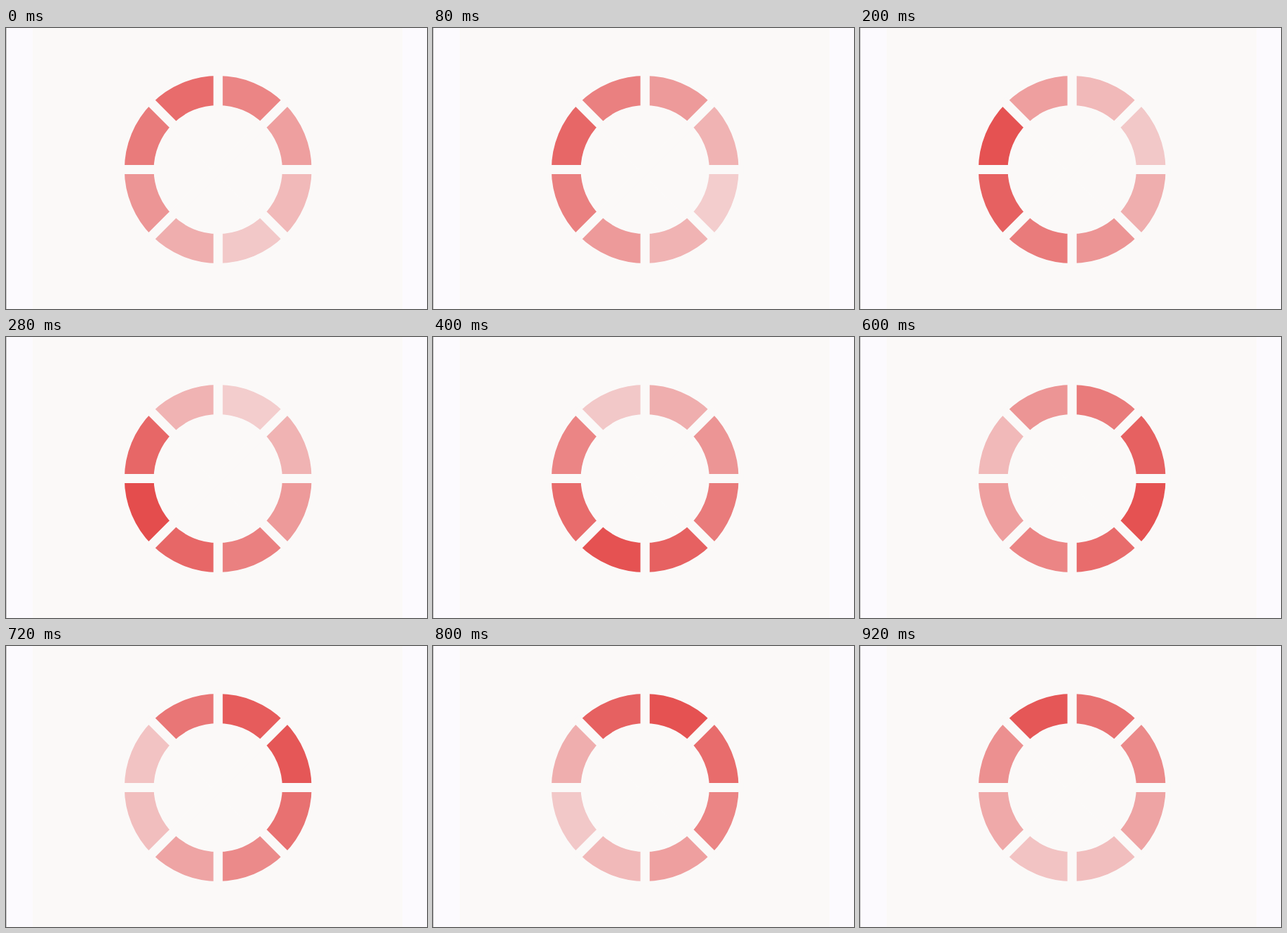
Animation of 600x400 px, one loop 960 ms. Source, as an HTML page:

```html
<!DOCTYPE html>
<html lang="en">
<head>
<meta charset="utf-8">
<title>Loading ring</title>
<style>
  html, body { margin: 0; width: 100%; height: 100%; overflow: hidden; background: #fcfafe; }
  svg { display: block; width: 600px; height: 400px; }
  #ring { fill: none; stroke-width: 41.8; }
  #gaps { stroke: #fbf9f8; stroke-width: 13.2; }
</style>
</head>
<body>
<svg viewBox="0 0 600 400">
  <rect width="600" height="400" fill="#fcfafe"/>
  <rect x="38" width="527" height="400" fill="#fbf9f8"/>
  <rect width="1" height="400" fill="#c4c3c5"/>
  <g transform="translate(302.2 201.5)">
    <g id="ring"></g>
    <g id="gaps"></g>
  </g>
</svg>
<script>
  const COUNT = 8, RADIUS = 112.5;
  const LOOP = 960, TICK = 40;               // ms
  const PERIOD = 1000, DELAY = 100, PEAK = 180;
  const DARK = [228, 77, 77], LIGHT = [243, 205, 205];

  const add = (parent, tag, attrs) => {
    const el = document.createElementNS('http://www.w3.org/2000/svg', tag);
    for (const key in attrs) el.setAttribute(key, attrs[key]);
    return document.getElementById(parent).appendChild(el);
  };

  const point = turn => {
    const a = turn * 2 * Math.PI;
    return `${RADIUS * Math.cos(a)} ${RADIUS * Math.sin(a)}`;
  };

  // Counterclockwise, starting with the upper segment on the left
  const segments = Array.from({ length: COUNT }, (_, i) => {
    const from = (4 - i) / COUNT;
    return add('ring', 'path', {
      d: `M${point(from)}A${RADIUS} ${RADIUS} 0 0 1 ${point(from + 1 / COUNT)}`
    });
  });

  for (let i = 0; i < COUNT / 2; i++) {
    add('gaps', 'line', { x1: -140, x2: 140, transform: `rotate(${i * 45})` });
  }

  // Triangle wave: 0 at the darkest moment, 1 half a period later
  const fade = ms => {
    const p = ((ms / PERIOD) % 1 + 1) % 1;
    return 2 * Math.min(p, 1 - p);
  };

  const shade = k => `rgb(${DARK.map((c, i) => Math.round(c + (LIGHT[i] - c) * k))})`;

  const start = performance.now();

  function draw() {
    const elapsed = (performance.now() - start) % LOOP;
    const t = Math.floor(elapsed / TICK) * TICK;
    segments.forEach((el, i) => el.setAttribute('stroke', shade(fade(t - PEAK - i * DELAY))));
    requestAnimationFrame(draw);
  }
  draw();
</script>
</body>
</html>
```
